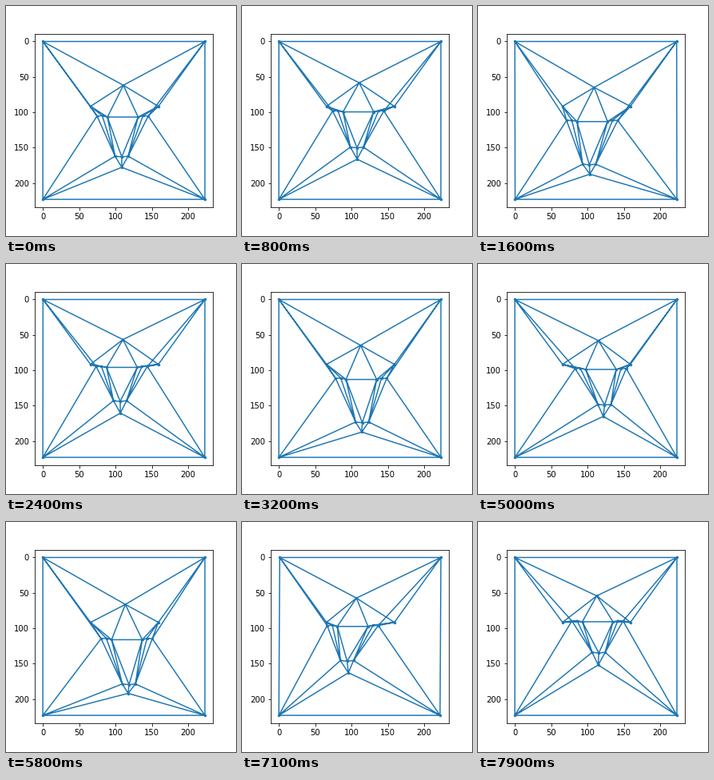
Recreate the animation shown at these times as a matplotlib script. Size 288 by 288 pixels, loop 8 s.

```python
from itertools import pairwise

import numpy as np
import matplotlib.pyplot as plt
from matplotlib.animation import FuncAnimation

FRAMES, STEP = 80, 100
SIZE = 223
PAD = SIZE * 0.05
HALF = SIZE / 2

# Mirrored pairs of points: middle x, half width, y
SHAPE = {
    "top": (HALF, HALF, 0),
    "bottom": (HALF, HALF, SIZE),
    "temple": (112.3, 46.7, 91.6),
    "brow": (110.8, 0, 61.8),
    "outer": (109.8, 35.2, 105.3),
    "mid": (109.8, 28, 104.9),
    "inner": (110, 21.1, 106.7),
    "mouth": (108.4, 9, 162),
    "lip": (108.6, 0, 163),
    "chin": (108.6, 0, 177.7),
}
FIXED = ("top", "bottom", "temple")

# Lines of one half, then the ones that join or lie on the middle
CHAINS = [
    "chin bottom top brow inner mouth",
    "brow temple outer mid inner lip mouth chin",
    "temple top outer bottom mouth mid temple inner",
    "outer mouth",
]
ACROSS = ("top", "bottom", "inner")

# The head circles outwards in a slowing spiral: frame, degrees, radius
TURNS = [(0, -288, 3.5), (16, 109, 15.4), (32, 423, 16.1), (42, 592, 15.5),
         (58, 781, 22.8), (71, 944, 18.9), (79, 1008, 26)]
CENTRE = np.array([-1.1, -3.3])

NAMES = list(SHAPE)
N = len(NAMES)
AT = {name: i for i, name in enumerate(NAMES)}


def gain(name):
    """How far a point follows the head: more the lower it sits."""
    if name in FIXED:
        return 0
    if name == "chin":
        return 0.88
    return min(1, (SHAPE[name][2] / SHAPE["mouth"][2]) ** 1.35)


def make_edges():
    half = [(AT[a], AT[b]) for c in CHAINS for a, b in pairwise(c.split())]
    edges = half + [(a + N, b + N) for a, b in half]
    edges += [(AT[n], AT[n] + N) for n in ACROSS]
    edges.append((AT["lip"], AT["chin"]))
    return np.array(edges)


mid_x, half_w, rest_y = np.array(list(SHAPE.values()), float).T
REST = np.array([np.column_stack([mid_x + side * half_w, rest_y])
                 for side in (-1, 1)])
GAIN = np.array([gain(n) for n in NAMES])[:, None]
EDGES = make_edges()
SINGLE = np.concatenate([np.full(N, True), half_w > 0])


def head_shift(i):
    keys, angle, radius = zip(*TURNS)
    a = np.radians(np.interp(i, keys, angle))
    return CENTRE + np.interp(i, keys, radius) * np.array([np.cos(a), np.sin(a)])


def pose(i):
    u, v = shift = head_shift(i)
    pts = REST + GAIN * shift
    pts[:, AT["chin"], 1] -= 0.0015 * v ** 2
    # Opposite corners lean inwards as the head swings left
    lean = 0.005 * min(u, 0) * v
    first, second = ("top", "bottom") if lean > 0 else ("bottom", "top")
    pts[0, AT[first], 0] += abs(lean)
    pts[1, AT[second], 0] -= abs(lean)
    return pts.reshape(-1, 2)


plt.rcParams["font.family"] = "DejaVu Sans"
fig = plt.figure(figsize=(4, 4), dpi=72, facecolor="white")
fig.subplots_adjust(left=0.125, right=0.9, bottom=0.125, top=0.88)
ax = fig.add_subplot()
ax.set(xlim=(-PAD, SIZE + PAD), ylim=(SIZE + PAD, -PAD),
       xticks=range(0, 201, 50), yticks=range(0, 201, 50))

lines, = ax.plot([], [], "-", color="C0", lw=1.5)
dots, = ax.plot([], [], ".", color="C0", ms=5)


def draw(i):
    pts = pose(i)
    segs = np.full((len(EDGES), 3, 2), np.nan)
    segs[:, :2] = pts[EDGES]
    lines.set_data(*segs.reshape(-1, 2).T)
    dots.set_data(*pts[SINGLE].T)
    return lines, dots


anim = FuncAnimation(fig, draw, frames=FRAMES, interval=STEP,
                     repeat=True, repeat_delay=0)
plt.show()
```
